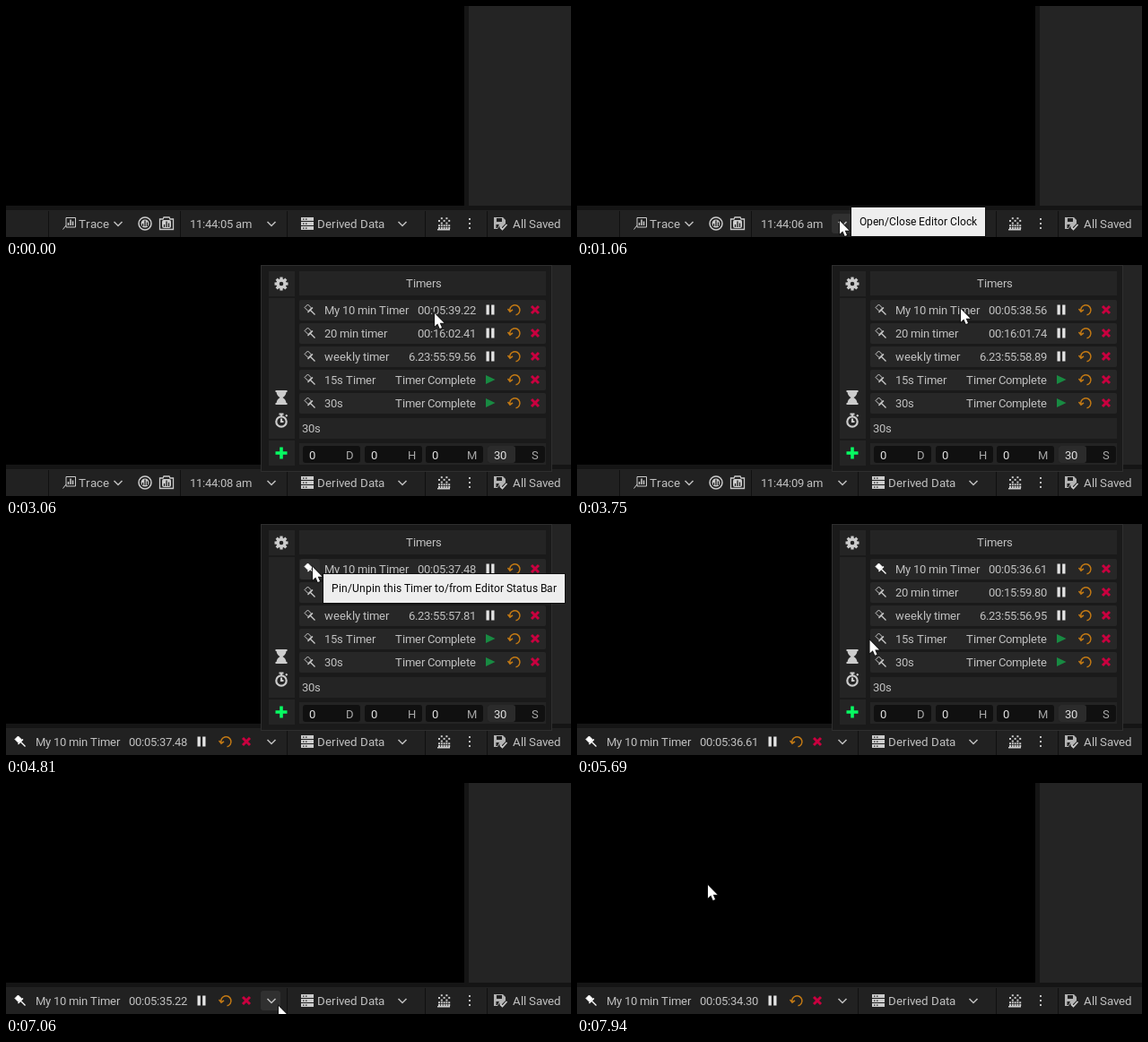
Write an HTML page with a canvas that moves like this. It is 630 by 258 pixels and loops after 8000 ms.

```html
<!DOCTYPE html>
<html lang="en">
<head>
<meta charset="utf-8">
<title>Editor clock timers</title>
<style>
  html, body { margin: 0; width: 100%; height: 100%; overflow: hidden; background: #000; }
  canvas { display: block; }
</style>
</head>
<body>
<canvas id="stage" width="630" height="258"></canvas>
<script>
const ctx = document.getElementById('stage').getContext('2d');
const LOOP = 8000, STEP = 62.5;
const OPEN = 1250, PIN = 4400, CLOSE = 6800;
const TEXT = '#c0c0c0', ICON = '#cccccc', PANEL = '#242424', DARK = '#151515', HOVER = '#303030';
const ORANGE = '#c47a14', RED = '#c9003f', GREEN = '#188a42';
const EDITOR_SIZE = 13.333, TIMER_SIZE = 13, TIP_SIZE = 12;

// Keyframes: [time, value, ...]
const cursorKeys = [
  [350, 301, 262], [700, 293, 240], [1500, 293, 240], [2130, 446, 57], [2440, 478, 54],
  [3100, 478, 54], [3750, 428, 49], [4100, 342, 48], [5250, 342, 48], [6250, 304, 249],
  [7100, 304, 249], [7800, 146, 114], [8000, 146, 114]
];
const timerKeys = [
  [0, 42.272], [2125, 40.137], [3750, 38.562], [4812.5, 37.482],
  [6500, 35.812], [7937.5, 34.302], [8000, 34.24]
];

const shapes = {
  pin: 'M-6-2.5L-2.5-6L1.5-2L-2 1.5Z',
  needle: 'M3-2.5L-2.5 3M.5.5L5.5 5.5',
  reset: 'M-5 2A5.6 5.6 0 1 1 1.5 5.8M-7.5-1L-5 2.2L-2-.2',
  cross: 'M-4-4L4 4M4-4L-4 4',
  pause: 'M-4.5-5.5h3.3v11h-3.3ZM1.2-5.5h3.3v11h-3.3Z',
  play: 'M-5-5L5.5 0L-5 5Z',
  chevron: 'M-4.5-2L0 2.5L4.5-2',
  plus: 'M-6.5 0H6.5M0-6.5V6.5',
  hourglass: 'M-6.5-8H6.5V-6H5.5Q5-2 1.5 0Q5 2 5.5 6H6.5V8H-6.5V6H-5.5Q-5 2-1.5 0Q-5-2-5.5-6H-6.5Z',
  watch: 'M-2.5-7.5H2.5M0-7.5V-5M5-5L6.5-6.5M0-2.5V1H2.5M5.7 1A5.7 5.7 0 1 1-5.7 1A5.7 5.7 0 1 1 5.7 1',
  chart: 'M-4-6.5H6.5V4H-4ZM-4 2L-7.5 6.5',
  bars: 'M-2.5 0V3M0-3.5V3M2.5-1.5V3',
  camera: 'M-7.5-5H-4L-3-7H3L4-5H7.5V6.5H-7.5Z',
  disk: 'M-7-7H3L6-4V0L1 5L-1 3L-3 6H-7ZM-4-6V-2H2V-6ZM-4.5 1V5H-3L-1 1Z',
  check: 'M0 4L2.5 6.5L7.5 1',
  cursor: 'M0 0V14.5L3.3 11.5L5.7 17L8 16L5.7 10.7H10.5Z'
};
for (const name in shapes) shapes[name] = new Path2D(shapes[name]);

function at(keys, time, ease = u => u) {
  let i = 1;
  while (i < keys.length - 1 && time > keys[i][0]) i++;
  const a = keys[i - 1], b = keys[i];
  const u = ease(Math.min(1, Math.max(0, (time - a[0]) / (b[0] - a[0]))));
  return a.slice(1).map((v, k) => v + (b[k + 1] - v) * u);
}
const smooth = u => u * u * (3 - 2 * u);
const between = (time, from, to) => time >= from && time < to;

function box(x, y, w, h, color, radius = 0) {
  ctx.fillStyle = color;
  ctx.beginPath();
  ctx.roundRect(x, y, w, h, radius);
  ctx.fill();
}

function fillShape(name, x, y, color) {
  ctx.save();
  ctx.translate(x, y);
  ctx.fillStyle = color;
  ctx.fill(shapes[name], 'evenodd');
  ctx.restore();
}

function strokeShape(name, x, y, color, width = 1.5) {
  ctx.save();
  ctx.translate(x, y);
  ctx.strokeStyle = color;
  ctx.lineWidth = width;
  ctx.stroke(shapes[name]);
  ctx.restore();
}

// Glyph advances snap to whole pixels, as in the editor's hinted UI text.
const advance = c => Math.round(ctx.measureText(c).width);

function textWidth(str, size) {
  ctx.font = `${size}px Roboto, sans-serif`;
  return [...str].reduce((sum, c) => sum + advance(c), 0);
}

function text(str, x, y, { color = TEXT, size = TIMER_SIZE, align = 0 } = {}) {
  x -= Math.round(textWidth(str, size) * align);
  ctx.fillStyle = color;
  for (const c of str) {
    ctx.fillText(c, x, y);
    x += advance(c);
  }
}

const two = n => String(n).padStart(2, '0');

function duration(seconds) {
  const cs = Math.floor(seconds * 100), s = Math.floor(cs / 100);
  const days = Math.floor(s / 86400);
  const clock = [s / 3600 % 24, s / 60 % 60, s % 60].map(v => two(Math.floor(v))).join(':');
  return `${days ? days + '.' : ''}${clock}.${two(cs % 100)}`;
}

function pin(x, y, pinned) {
  const color = pinned ? '#fff' : ICON;
  if (pinned) fillShape('pin', x, y, color);
  strokeShape('pin', x, y, color, 1);
  strokeShape('needle', x, y, color, 1.3);
}

function controls(x, y, running) {
  if (running) fillShape('pause', x, y, '#e4e4e4');
  else fillShape('play', x, y, GREEN);
  strokeShape('reset', x + 27, y, ORANGE);
  strokeShape('cross', x + 50, y, RED, 3);
}

function tooltip(str, x, y, alpha) {
  if (alpha <= 0) return;
  const width = textWidth(str, TIP_SIZE) + 18;
  ctx.save();
  ctx.globalAlpha = alpha;
  box(x - 1, y - 1, width + 2, 34, '#111');
  box(x, y, width, 32, '#eeeeee');
  ctx.globalAlpha = Math.sqrt(alpha);
  text(str, x + 9, y + 20, { color: '#080808', size: TIP_SIZE });
  ctx.restore();
}

const fade = (time, from, to) => time >= to ? 0 : Math.min(1, Math.max(0, (time - from) / 125));

function statusBar(time, remaining) {
  box(0, 223, 630, 35, DARK);
  box(0, 228, 630, 30, '#212121');
  const pinned = time >= PIN;
  for (const x of pinned ? [313, 467, 536] : [47, 194, 313, 467, 536]) box(x, 229, 1, 29, '#101010');

  if (pinned) {
    pin(16, 243, true);
    text('My 10 min Timer', 33, 248);
    text(duration(remaining), 137, 248);
    controls(218, 243, true);
  } else {
    strokeShape('chart', 71, 243, ICON, 1);
    strokeShape('bars', 72, 242, ICON, 1.5);
    text('Trace', 81, 248, { size: EDITOR_SIZE });
    strokeShape('chevron', 125, 243, TEXT);
    ctx.strokeStyle = ICON;
    ctx.lineWidth = 1.5;
    ctx.beginPath();
    ctx.arc(155, 243, 7, 0, 7);
    ctx.stroke();
    box(150.5, 238.5, 9, 9, ICON, 4.5);
    strokeShape('bars', 155, 243, '#222', 1.3);
    strokeShape('camera', 179, 243, ICON, 1.3);
    box(174, 239, 10, 9, ICON, 2);
    strokeShape('bars', 179, 244, '#222', 1.3);
    const second = 5 + Math.floor((time + 280) / 1000);
    text(`11:44:${two(second)} am`, 205, 248);
  }

  if (between(time, 650, 1650) || between(time, 6150, 7200)) box(284, 232, 22, 22, HOVER, 3);
  strokeShape('chevron', 296, 243, TEXT);

  for (let i = 0; i < 3; i++) {
    box(329, 236 + i * 5, 14, 4, ICON);
    box(331, 237.5 + i * 5, 1.5, 1.3, '#222');
    box(334, 237.5 + i * 5, 1.5, 1.3, '#222');
  }
  text('Derived Data', 347, 248, { size: EDITOR_SIZE });
  strokeShape('chevron', 442, 243, TEXT);

  // Dots thin out towards the top.
  for (let row = 0; row < 5; row++)
    for (let col = 0; col < 5; col++)
      if (row < 2 || (row + col) % 2) box(482 + col * 2.8, 247 - row * 2.7, 2, 2, ICON);
  box(481, 249, 14, 1.5, ICON);
  for (const y of [237, 242, 247]) box(516, y, 2, 2, TEXT);
  fillShape('disk', 551, 243, '#b4b4b4');
  strokeShape('check', 551, 243, ICON, 1.8);
  text('All Saved', 565, 248, { size: EDITOR_SIZE });
}

function gear(x, y) {
  ctx.save();
  ctx.translate(x, y);
  for (let i = 0; i < 8; i++) {
    box(-1.6, -7.5, 3.2, 4, ICON);
    ctx.rotate(Math.PI / 4);
  }
  ctx.strokeStyle = ICON;
  ctx.lineWidth = 3.4;
  ctx.beginPath();
  ctx.arc(0, 0, 4, 0, 7);
  ctx.stroke();
  ctx.restore();
}

function popup(time, remaining) {
  box(284, 0, 325, 231, '#2e2e2e');
  box(285, 1, 323, 229, '#1a1a1a');
  box(293, 7, 29, 28, PANEL);
  box(293, 37, 29, 157, PANEL);
  box(293, 196, 29, 28, PANEL);
  gear(307, 21);
  fillShape('hourglass', 307, 148, ICON);
  strokeShape('watch', 307, 174, ICON, 2.2);
  strokeShape('plus', 307, 210, '#06fa62', 3.6);

  box(327, 7, 275, 27, PANEL);
  text('Timers', 466, 25, { align: .5 });

  const weekly = 6 * 86400 + 23 * 3600 + 50 * 60 + 20.335;
  const timers = [
    ['My 10 min Timer', remaining], ['20 min timer', remaining + 323.185 + 300],
    ['weekly timer', remaining + weekly], ['15s Timer'], ['30s']
  ];
  timers.forEach(([name, left], i) => {
    const y = 50 + i * 26;
    box(327, y - 11, 275, 23, '#272727', 2);
    if (i === 0 && between(time, 4050, 5350)) box(328, y - 11, 22, 23, HOVER, 3);
    pin(339, y, i === 0 && time >= PIN);
    text(name, 355, y + 5);
    text(left ? duration(left) : 'Timer Complete', 524, y + 5, { align: 1 });
    controls(540, y, !!left);
  });

  box(327, 171, 275, 23, PANEL);
  text('30s', 330, 187);
  box(327, 199, 275, 24, PANEL);
  [['0', 'D'], ['0', 'H'], ['0', 'M'], ['30', 'S']].forEach(([value, unit], i) => {
    const x = Math.round(331 + i * 68.6);
    box(x, 202, 64, 19, '#101010', 3);
    if (value !== '0') box(x, 202, 31, 19, '#2b2b2b', 3);
    text(value, x + 7, 217, { color: '#e0e0e0' });
    text(unit, x + 57, 217, { align: 1, color: '#a8a8a8' });
  });
}

function draw(time) {
  const remaining = 300 + at(timerKeys, time)[0];
  box(0, 0, 630, 258, DARK);
  box(0, 0, 511, 223, '#000');
  box(516, 0, 114, 223, PANEL);
  statusBar(time, remaining);
  if (between(time, OPEN, CLOSE)) popup(time, remaining);

  const clockTip = 'Open/Close Editor Clock';
  tooltip(clockTip, 306, 225, fade(time, 800, OPEN));
  tooltip('Pin/Unpin this Timer to/from Editor Status Bar', 354, 56, fade(time, 4200, 5350));
  const late = fade(time, 6435, CLOSE);
  tooltip(clockTip, Math.round(316 + 20 * (1 - late)), 225, late);

  if (time > 350) {
    const [x, y] = at(cursorKeys, time, smooth);
    strokeShape('cursor', x, y, '#111', 1.6);
    fillShape('cursor', x, y, '#fff');
  }
}

function tick(now) {
  draw(Math.floor((now % LOOP + 5) / STEP) * STEP % LOOP);
  requestAnimationFrame(tick);
}
requestAnimationFrame(tick);
</script>
</body>
</html>
```
